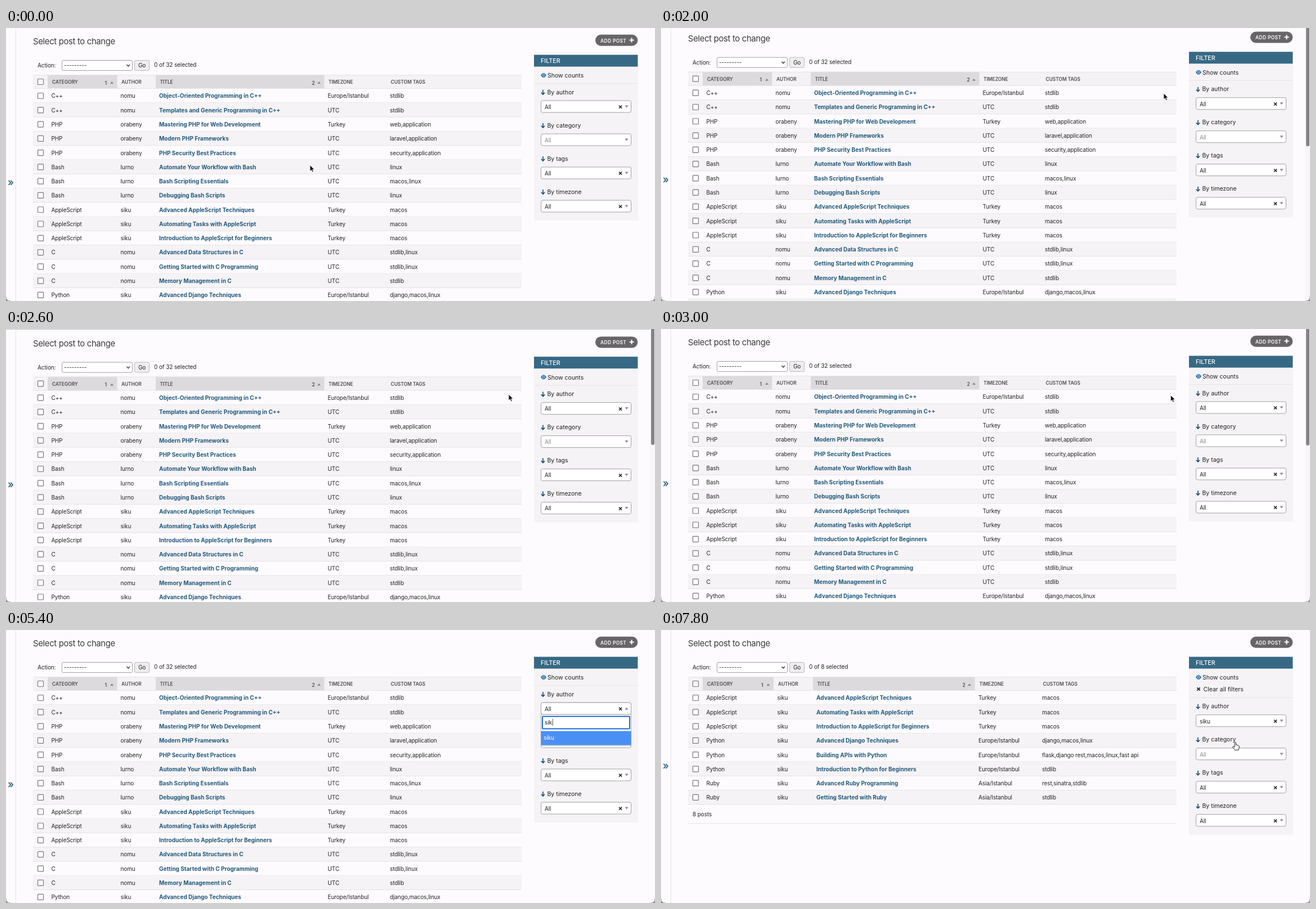
These frames come from a looping animation (1153x485 px, 8 s). An HTML page:

```html
<!DOCTYPE html>
<html lang="en">
<head>
<meta charset="utf-8">
<title>Select post to change</title>
<style>
html, body { margin: 0; width: 100%; height: 100%; overflow: hidden; background: #fdfbfd; }
svg { display: block; width: 1153px; height: 485px; }
text { font: 10px Inter, Roboto, sans-serif; letter-spacing: -.1px; fill: #222; white-space: pre; }
.title { font-size: 14.8px; letter-spacing: -.3px; fill: #3a3a3a; }
.head { font-size: 8.4px; font-weight: 600; letter-spacing: 0; fill: #4c4c4c; }
.link { font-weight: 650; letter-spacing: 0; fill: #23597c; }
.side { font-size: 10.5px; letter-spacing: 0; }
.bar { font-size: 10.7px; font-weight: 500; letter-spacing: 0; fill: #fff; }
.add { font-size: 8.4px; font-weight: 600; letter-spacing: .4px; fill: #fff; }
.cross { font-size: 12px; font-weight: 700; }
.muted { fill: #888; }
.white { fill: #fff; }
.mark { font-size: 18px; font-weight: 500; fill: #23597c; }
</style>
</head>
<body>
<svg viewBox="0 0 1153 485">
  <rect width="1153" height="485" fill="#fdfbfd"/>
  <g id="all"></g>
  <g id="filtered"></g>
  <g id="menu"></g>
  <g id="scrollbar">
    <rect x="1144" width="9" height="485" fill="#f8f6f8"/>
    <rect id="thumb" x="1146" y="-6" width="6" rx="3" fill="#858386"/>
  </g>
  <path d="M0 477V485H8Q0 485 0 477ZM1153 477V485H1145Q1153 485 1153 477Z" fill="#777" stroke="#aaa"/>
  <path id="arrow" d="M0 0V11L2.6 8.7 4.3 12.6 6.3 11.7 4.6 7.9H8Z" fill="#111" stroke="#fff" stroke-width=".8"/>
  <path id="hand" d="M-1.4 7V1Q-1.4 0 -.2 0 1 0 1 1V5Q3 4 3.2 5.4 5 4.8 5.2 6.2 6.7 6 6.7 7.5V9.5L5.4 14H-.8L-4.6 9.2Q-5.2 7.6 -3.6 7.4L-1.4 9Z" fill="#fff" stroke="#222" stroke-width="1"/>
</svg>
<script>
const ROW = 25.28, LOOP = 8000, STEP = 200;
const $ = id => document.getElementById(id);

const posts = `C++|nomu|Object-Oriented Programming in C++|Europe/Istanbul|stdlib
C++|nomu|Templates and Generic Programming in C++|UTC|stdlib
PHP|orabeny|Mastering PHP for Web Development|Turkey|web,application
PHP|orabeny|Modern PHP Frameworks|UTC|laravel,application
PHP|orabeny|PHP Security Best Practices|UTC|security,application
Bash|lurno|Automate Your Workflow with Bash|UTC|linux
Bash|lurno|Bash Scripting Essentials|UTC|macos,linux
Bash|lurno|Debugging Bash Scripts|UTC|linux
AppleScript|siku|Advanced AppleScript Techniques|Turkey|macos
AppleScript|siku|Automating Tasks with AppleScript|Turkey|macos
AppleScript|siku|Introduction to AppleScript for Beginners|Turkey|macos
C|nomu|Advanced Data Structures in C|UTC|stdlib,linux
C|nomu|Getting Started with C Programming|UTC|stdlib,linux
C|nomu|Memory Management in C|UTC|stdlib
Python|siku|Advanced Django Techniques|Europe/Istanbul|django,macos,linux
Python|siku|Building APIs with Python|Europe/Istanbul|flask,django rest,macos,linux,fast api
Python|siku|Introduction to Python for Beginners|Europe/Istanbul|stdlib
Ruby|siku|Advanced Ruby Programming|Asia/Istanbul|rest,sinatra,stdlib
Ruby|siku|Getting Started with Ruby|Asia/Istanbul|stdlib`.split('\n').map(line => line.split('|'));

// y is the middle of the line of text
const text = (x, y, str, cls = '') => `<text x="${x}" y="${y + 3.6}" class="${cls}">${str}</text>`;
const rect = (x, y, w, h, fill, more = '') => `<rect x="${x}" y="${y}" width="${w}" height="${h}" fill="${fill}" ${more}/>`;
const path = (d, fill, more = '') => `<path d="${d}" fill="${fill}" ${more}/>`;
const rule = (x, y, w, color = '#e6e4e6') => rect(x, y, w, 1, color);
const triangle = (x, y, dir, fill = '#888') => path(`M${x - 3} ${y - 2 * dir}h6l-3 ${4 * dir}z`, fill);
const checkbox = y => rect(56.5, y - 5, 10, 10, '#fff', 'rx="1" stroke="#777" stroke-width="1.2"');

function table(rows, cols, sorted) {
  const [firstEnd, secondStart, secondEnd] = sorted;
  let out = rect(48, 83, 868, 25, '#f4f2f4') + rect(74, 83, firstEnd - 74, 25, '#dcdadc')
    + rect(secondStart, 83, secondEnd - secondStart, 25, '#dcdadc')
    + rule(48, 83, 868) + rule(48, 107, 868) + checkbox(95.5);
  ['CATEGORY', 'AUTHOR', 'TITLE', 'TIMEZONE', 'CUSTOM TAGS'].forEach((name, i) => {
    out += text(cols[i] + 1.5, 95.6, name, 'head');
  });
  [firstEnd, secondEnd].forEach((end, i) => {
    out += text(end - 22, 97, i + 1, 'head') + triangle(end - 9.5, 97, -1);
  });
  rows.forEach((row, i) => {
    const top = 108 + i * ROW, mid = top + 12.8;
    if (i % 2) out += rect(48, top, 868, ROW, '#f5f3f5');
    out += rule(48, top + ROW - 1, 868) + checkbox(mid - .3);
    row.forEach((cell, k) => out += text(cols[k], mid, cell, k === 2 ? 'link' : ''));
  });
  return out;
}

function select(y, value, muted, open) {
  return rect(950.5, y - 10.5, 160, 21, '#fff', 'rx="3" stroke="#a2a0a2"')
    + text(957, y + .8, value, muted ? 'muted' : '')
    + (muted ? '' : text(1087.5, y + 1.2, '×', 'cross'))
    + triangle(1102.5, y, open ? -1 : 1);
}

function sidebar(author, shift) {
  let out = rect(938, 68, 185, 274 + shift, '#f5f3f5') + rect(938, 47.6, 184.4, 21, '#376985')
    + text(950, 58.5, 'FILTER', 'bar')
    + path('M950 84q5 -8 10 0q-5 8 -10 0z', '#2b75b5')
    + '<circle cx="955" cy="83.8" r="1.9" fill="none" stroke="#fff" stroke-width=".7"/>'
    + text(962, 84.8, 'Show counts', 'side') + rule(938, 98 + shift, 185);
  if (shift) {
    out += path('M952.5 102.5l5 5m0-5l-5 5', 'none', 'stroke="#333" stroke-width="2"')
      + text(963.5, 105.3, 'Clear all filters', 'side');
  }
  ['author', 'category', 'tags', 'timezone'].forEach((name, i) => {
    const y = 114 + shift + i * 59;
    out += path(`M954 ${y - 4}v8m-3.2-3.2l3.2 3.2l3.2-3.2`, 'none', 'stroke="#174c78" stroke-width="1.6"')
      + text(961.5, y, 'By ' + name, 'side')
      + select(y + 25.5, i ? 'All' : author, i === 1);
  });
  return out;
}

function page({ rows, count, cols, sorted, author, shift, markY }) {
  return rect(0, -20, 1153, 18.8, '#4a7aa0') + rect(17, -1, 1, 520, '#e5e3e5')
    + text(3, markY + .6, '»', 'mark')
    + text(48, 25.4, 'Select post to change', 'title')
    + rect(1047, 11.8, 75.3, 20, '#676567', 'rx="10"') + text(1056, 22, 'ADD POST', 'add')
    + path('M1107.5 21.5h8m-4-4v8', 'none', 'stroke="#fff" stroke-width="2"')
    + text(56, 66.8, 'Action:')
    + rect(99.5, 57.5, 125, 18, '#fff', 'rx="2.5" stroke="#a2a0a2"') + text(103, 66.8, '---------')
    + path('M214.5 65l2.7 3 2.7-3', 'none', 'stroke="#333" stroke-width="1.4"')
    + rect(228.5, 57.5, 26, 18, '#efedef', 'rx="2.5" stroke="#bbb"') + text(235, 66.8, 'Go')
    + text(263, 65.8, `0 of ${count} selected`)
    + table(rows, cols, sorted) + sidebar(author, shift);
}

function menu(typed) {
  const names = typed ? ['siku'] : ['nomu', 'orabeny', 'lurno', 'siku'];
  let out = select(139.5, 'All', false, true)
    + rect(950.5, 150, 160, 30 + names.length * 25, '#fff', 'stroke="#aaa"')
    + rect(953, 153.5, 155, 22, '#fff', 'rx="1" stroke="#1a6ad6" stroke-width="2"')
    + `<text x="957" y="168.2">${typed}<tspan fill="#111" dx="-.5">|</tspan></text>`
    + rect(950.5, 179.5, 160, 25, '#4a90f4');
  names.forEach((name, i) => out += text(955, 191.5 + i * 25, name, i ? '' : 'white'));
  return out;
}

$('all').innerHTML = page({
  rows: posts.slice(0, 16), count: 32, cols: [80.5, 203.5, 272, 571.5, 682],
  sorted: [197.5, 266, 565.5], author: 'All', shift: 0, markY: 276
});
$('filtered').innerHTML = page({
  rows: posts.filter(post => post[1] === 'siku'), count: 8, cols: [80.5, 206.5, 276, 564, 677],
  sorted: [200, 270, 557.5], author: 'siku', shift: 21.7, markY: 243
}) + text(56, 327.8, '8 posts') + rule(48, 343, 868);

const scrollKeys = [[0, 0], [1400, 0], [2000, -5.3], [2200, -5.3], [2600, 1.6], [3000, 0]];
const cursorKeys = [[0, 540, 243.5], [400, 540, 243.5], [1600, 893, 116], [2800, 893, 116],
  [3800, 1012, 131], [6800, 1012, 131], [7600, 1020.5, 199.3]];
const typingKeys = [[4600, ''], [5000, 's'], [5200, 'si'], [5400, 'sik'], [5800, 'siku']];

function at(keys, time) {
  const i = keys.findLastIndex(key => key[0] <= time);
  const a = keys[i], b = keys[i + 1] || a;
  const p = b === a ? 0 : (time - a[0]) / (b[0] - a[0]);
  const eased = p * p * (3 - 2 * p);
  return a.slice(1).map((v, k) => v + (b[k + 1] - v) * eased);
}
const show = (id, on) => $(id).style.display = on ? '' : 'none';

let lastTyped;
function draw(time) {
  const [scroll] = at(scrollKeys, time), [x, y] = at(cursorKeys, time);
  const loaded = time >= 6200, hand = time >= 3600;
  const pointing = time < 5000 || time >= 6800;
  const typed = typingKeys.findLast(key => key[0] <= time)?.[1] ?? '';

  show('all', !loaded);
  show('filtered', loaded);
  $('all').setAttribute('transform', `translate(0 ${scroll})`);
  show('menu', time >= 4600 && !loaded);
  if (typed !== lastTyped) $('menu').innerHTML = menu(lastTyped = typed);

  show('scrollbar', time >= 1600 && time < 5200);
  $('thumb').setAttribute('height', 213 - scroll * .6);

  show('arrow', pointing && !hand);
  show('hand', pointing && hand);
  $(hand ? 'hand' : 'arrow').setAttribute('transform', `translate(${x} ${y})`);
}

const start = performance.now();
function tick() {
  const time = (performance.now() - start) % LOOP;
  draw(Math.floor(time / STEP) * STEP);
  requestAnimationFrame(tick);
}
tick();
</script>
</body>
</html>
```
